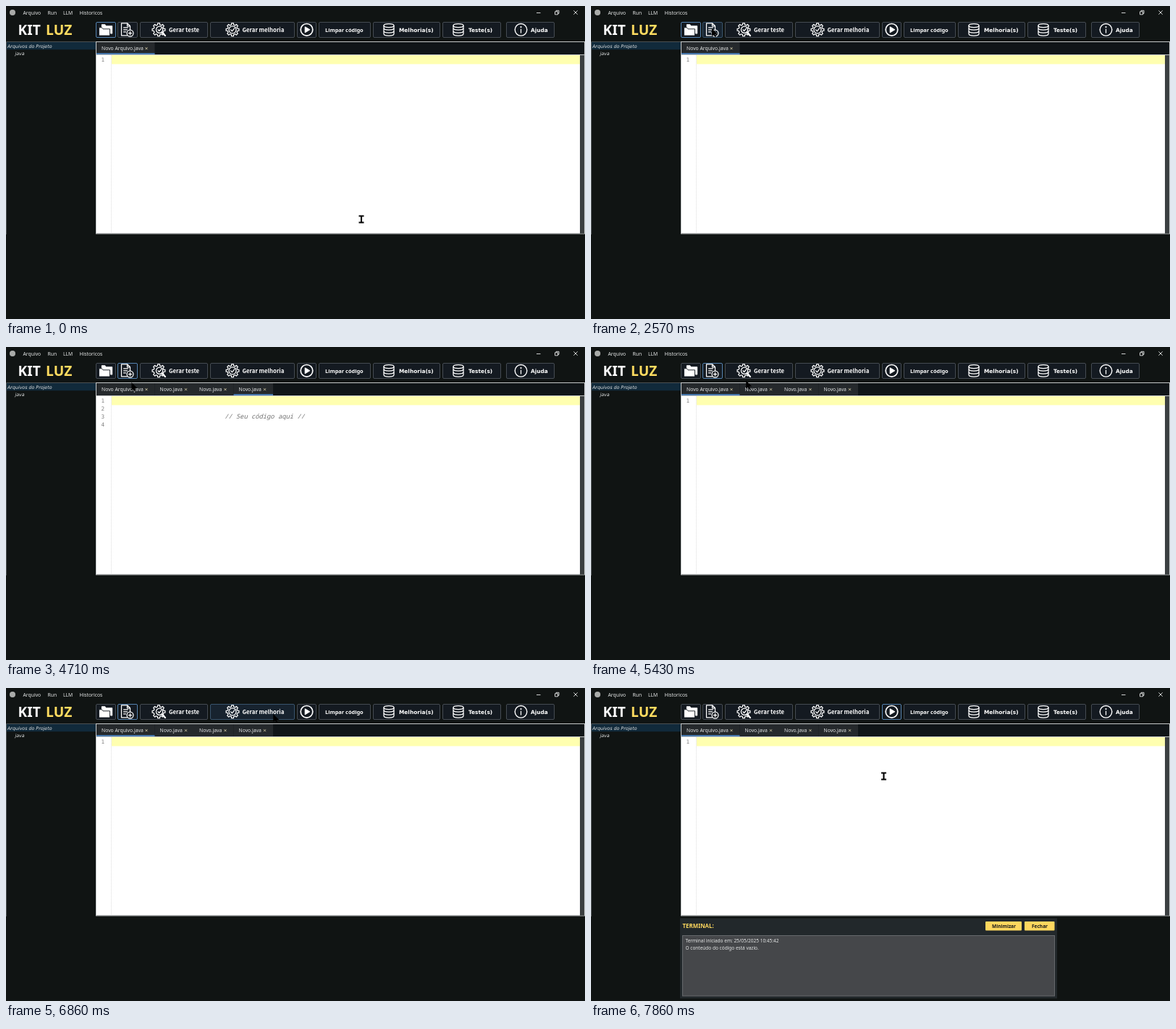
These frames come from a looping animation (800 by 433 pixels, 8000 ms). An HTML page:

```html
<!DOCTYPE html>
<html lang="pt">
<head>
<meta charset="utf-8">
<style>
html, body { margin: 0; width: 100%; height: 100%; overflow: hidden; background: #101413; }
svg { display: block; width: 100%; height: 100%; }
text { font-family: "Noto Sans", sans-serif; font-size: 6.8px; fill: #e4e6e6; white-space: pre; }
.bold { font-weight: 700; fill: #fff; }
.title { font-size: 19.2px; }
.narrow { font-family: "Noto Sans CJK JP", "Noto Sans CJK", sans-serif; font-size: 7.8px; }
.wide { font-family: "DejaVu Sans", sans-serif; font-size: 7.4px; }
.tree { font-family: "DejaVu Sans", sans-serif; font-size: 6.3px; font-style: italic; }
.mono { font-family: "DejaVu Sans Mono", monospace; font-size: 7.6px; fill: #808080; }
.comment { font-family: "Noto Sans Mono", monospace; font-size: 8.8px; font-style: italic; fill: #707070; }
.log { font-size: 6.5px; }
.icon { fill: none; stroke: #fff; stroke-width: 1.25; stroke-linejoin: round; stroke-linecap: round; }
.button { fill: #141a21; stroke: #454b52; }
.button.hover { fill: #17232f; stroke: #39546d; }
.button.focus { stroke: #5583b0; }
</style>
</head>
<body>
<svg id="stage" viewBox="0 0 800 433" preserveAspectRatio="none"></svg>
<script>
const stage = document.getElementById('stage');
const rect = (x, y, w, h, attrs) => `<rect x="${x}" y="${y}" width="${w}" height="${h}" ${attrs}/>`;
const text = (x, y, str, cls = '', attrs = '') => `<text x="${x}" y="${y}" class="${cls}" ${attrs}>${str}</text>`;
const icon = (x, y, body) => `<g class="icon" transform="translate(${x} ${y})">${body}</g>`;
const path = (d, attrs = '') => `<path d="${d}" ${attrs}/>`;
const circle = (x, y, r, attrs = '') => `<circle cx="${x}" cy="${y}" r="${r}" ${attrs}/>`;

const gear = radius => {
  const points = [];
  for (let tooth = 0; tooth < 8; tooth++) {
    for (const [offset, scale] of [[-.3, .78], [-.2, 1], [.2, 1], [.3, .78]]) {
      const angle = (tooth + offset) * Math.PI / 4;
      points.push(`${(Math.cos(angle) * radius * scale).toFixed(2)} ${(Math.sin(angle) * radius * scale).toFixed(2)}`);
    }
  }
  return path(`M${points.join('L')}Z`);
};

const database = [-5.5, -1.5, 2.5].map(y => path(`M-7 ${y}v3.3c0 3.4 14 3.4 14 0v-3.3`)).join('')
  + '<ellipse cy="-5.7" rx="7" ry="2.6"/>';
const icons = {
  folders: path('M-5 1V-7h4l1.5 2H9V5H7', 'fill="#fff"')
    + path('M-9 8V-3h4l1.5 2H6V8Z', 'fill="#fff" stroke="#141a21" stroke-width=".9"'),
  file: path('M0 8H-8V-9H0L4 -5V0M0 -9V-5H4M-5 -3H1M-5 0H0M-5 3H-2') + circle(4, 4.8, 4.5) + path('M4 2.6V7M1.8 4.8H6.2'),
  inspect: gear(9) + circle(1, 0, 4.6, 'fill="#141a21"') + path('M-1 0l1.6 1.7 2.8-3.4')
    + path('M4.6 3.8L9 8.2', 'stroke-width="2.2"'),
  approve: gear(9) + circle(0, 0, 5) + path('M-2.4 0l1.8 2 3.2-4'),
  play: circle(0, 0, 8.3, 'stroke-width="1.7"') + path('M-2.2 -3.7L4 0L-2.2 3.7Z', 'fill="#fff"'),
  database,
  info: circle(0, 0, 8.3, 'stroke-width="1.4"') + path('M0 -.8V4.2') + circle(0, -3.8, .5, 'fill="#fff"'),
};

// x, width, icon, icon x, label, label x, label style
const buttons = [
  [124.5, 27, 'folders', 137.5],
  [154.5, 27, 'file', 167.5],
  [185.5, 93, 'inspect', 211, 'Gerar teste', 225, 'narrow'],
  [282.5, 116, 'approve', 313, 'Gerar melhoria', 326.5, 'narrow'],
  [402.5, 26, 'play', 415.5],
  [432.5, 71, '', 0, 'Limpar código', 441, 'limpar'],
  [507.5, 92, 'database', 529, 'Melhoria(s)', 543, 'wide'],
  [603.5, 80, 'database', 625, 'Teste(s)', 639, 'wide'],
  [691.5, 66, 'info', 711.5, 'Ajuda', 725, 'wide'],
];
const FOLDERS = 0, FILE = 1, PLAY = 4;

const toolbar = buttons.map(([x, w, name, iconX, label, labelX, style]) =>
  rect(x, 22.5, w, 21, 'rx="1.5" class="button"')
  + (name ? icon(iconX, 32.8, icons[name]) : '')
  + (label ? text(labelX, 35.7, label, `bold ${style}`, style === 'limpar' ? 'style="font-size:7.4px"' : '') : '')
).join('');

const tabLeft = i => i ? 151 + i * 54.5 : 125;
const tabWidth = i => i ? 54.5 : 80.5;
const tabs = [0, 1, 2, 3].map(i => {
  const x = tabLeft(i), w = tabWidth(i);
  return `<g class="tab">${rect(x, 50, w, 17, 'fill="#25292c"')}`
    + text(x + 7, 61.2, i ? 'Novo.java' : 'Novo Arquivo.java')
    + path(`M${x + w - 13} 57.2l3 3m0-3l-3 3`, 'stroke="#d2c9a4" stroke-width=".9"') + '</g>';
}).join('');

const terminalButton = (x, w, label, labelX) =>
  rect(x, 323, w, 12.5, 'rx="1" fill="#ffd75e"') + text(labelX, 331.7, label, 'bold', 'style="font-size:6.55px;fill:#17191a"');

stage.innerHTML = rect(0, 0, 800, 433, 'fill="#101413"')
  + circle(9, 9, 4, 'fill="#a9aba9"')
  + [[23.5, 'Arquivo'], [57.5, 'Run'], [79, 'LLM'], [101.5, 'Historicos']].map(([x, s]) => text(x, 11.6, s)).join('')
  + path('M733 9.5h5.5M758.5 7.8h4v4h-4zM760 7.8v-1.5h4v4h-1.5M784.3 6.3l5.4 5.4m0-5.4l-5.4 5.4', 'fill="none" stroke="#e4e6e6" stroke-width=".9"')
  + text(16.5, 40.2, 'KIT', 'bold title') + text(55, 40.2, 'LUZ', 'bold title', 'style="fill:#ffdc60"')
  + toolbar
  + path('M.5 316V49.5H124', 'fill="none" stroke="#4b5052"')
  + rect(1, 50, 123, 10.3, 'fill="#112a3b"')
  + text(2, 57.7, 'Arquivos do Projeto', 'tree') + text(12.5, 67.7, 'java', 'tree')
  + rect(124.5, 49.5, 675, 265.5, 'fill="#101518" stroke="#c5c8c9"')
  + tabs + rect(125, 65, 80.5, 2, 'id="underline" fill="#4778ad"')
  + rect(125, 67.5, 668, 247, 'fill="#fff"') + rect(146, 68, 647, 12.4, 'fill="#ffffb0"')
  + rect(793, 67.5, 6, 247, 'fill="#3b3f41"')
  + path('M125 67.5H799', 'stroke="#c5c8c9"')
  + path('M145.5 68V314', 'stroke="#ddd" stroke-dasharray="1 1"')
  + text(131.5, 76.5, '1', 'mono')
  + '<g id="newFile">' + [2, 3, 4].map(n => text(131.5, 76.5 + (n - 1) * 11.2, n, 'mono')).join('')
  + text(302, 98.8, '// Seu código aqui //', 'comment') + '</g>'
  + '<g id="terminal">' + rect(123, 318.5, 521, 111, 'fill="#22282b"')
  + text(126.5, 332, 'TERMINAL:', 'bold', 'style="font-size:7.9px;fill:#ffd75e"')
  + terminalButton(545, 50, 'Minimizar', 554) + terminalButton(599, 41.5, 'Fechar', 609)
  + rect(126.5, 342.5, 514, 83.5, 'fill="#45474a" stroke="#66696c"')
  + text(130.5, 352.2, 'Terminal iniciado em: 25/05/2025 10:45:42', 'log')
  + text(130.5, 361.5, 'O conteúdo do código está vazio.', 'log') + '</g>'
  + path('M0 0V11L2.6 8.6 4.3 12 6 11.2 4.4 8H8Z', 'id="arrow"')
  + path('M-3.5 -4.5H3.5M-3.5 4.5H3.5M0 -4.5V4.5', 'id="beam" stroke="#000" stroke-width="2.1"');

const find = id => document.getElementById(id);
const underline = find('underline'), newFile = find('newFile'), terminal = find('terminal');
const arrow = find('arrow'), beam = find('beam');
const buttonRects = [...stage.querySelectorAll('.button')];
const tabGroups = [...stage.querySelectorAll('.tab')];

const LOOP = 8000, TICK = 1000 / 7;
const NEW_FILES = [3714, 4142, 4428], PICK_TAB = 5142, RUN = 7428, SHOW_TERMINAL = 7714;
// time, x, y of the pointer
const route = [
  [0, 491, 295], [286, 491, 295], [1142, 400, 222], [1714, 290, 130], [2286, 188, 54], [2571, 167, 31],
  [3286, 169, 32], [3857, 181, 42], [4428, 179, 41], [4714, 168, 57], [5142, 168, 57],
  [5571, 230, 43], [6143, 320, 36], [6571, 330, 36], [7143, 408, 36], [7571, 411, 36], [7714, 409, 62], [7857, 404.5, 122],
];

function pointerAt(time) {
  const next = route.findIndex(point => point[0] > time);
  if (next < 0) return route.at(-1).slice(1);
  const [t0, x0, y0] = route[next - 1], [t1, x1, y1] = route[next];
  const u = (time - t0) / (t1 - t0), eased = u * u * (3 - 2 * u);
  return [x0 + (x1 - x0) * eased, y0 + (y1 - y0) * eased];
}

const show = (element, visible) => element.setAttribute('visibility', visible ? 'visible' : 'hidden');

function draw(now) {
  const time = Math.floor((now % LOOP + 2) / TICK) * TICK + .9;
  const [x, y] = pointerAt(time);
  const created = NEW_FILES.filter(t => time >= t).length;
  const selected = time < PICK_TAB ? created : 0;
  const focused = time >= RUN ? PLAY : created ? FILE : FOLDERS;

  buttonRects.forEach((button, i) => {
    const [left, width] = buttons[i];
    button.classList.toggle('hover', x >= left && x <= left + width && y >= 22 && y <= 44);
    button.classList.toggle('focus', i === focused);
  });
  tabGroups.forEach((tab, i) => {
    const hovered = i !== selected && x >= tabLeft(i) && x < tabLeft(i) + tabWidth(i) && y >= 50 && y < 67;
    show(tab, i <= created);
    tab.firstChild.setAttribute('fill', hovered ? '#11171a' : '#25292c');
  });
  underline.setAttribute('x', tabLeft(selected));
  underline.setAttribute('width', tabWidth(selected));
  show(newFile, selected > 0);
  show(terminal, time >= SHOW_TERMINAL);

  const editing = x > 146 && x < 793 && y > 68 && y < 315;
  show(arrow, !editing);
  show(beam, editing);
  (editing ? beam : arrow).setAttribute('transform', `translate(${x.toFixed(2)} ${y.toFixed(2)})`);
}

function loop() {
  draw(performance.now());
  requestAnimationFrame(loop);
}
loop();
</script>
</body>
</html>
```
